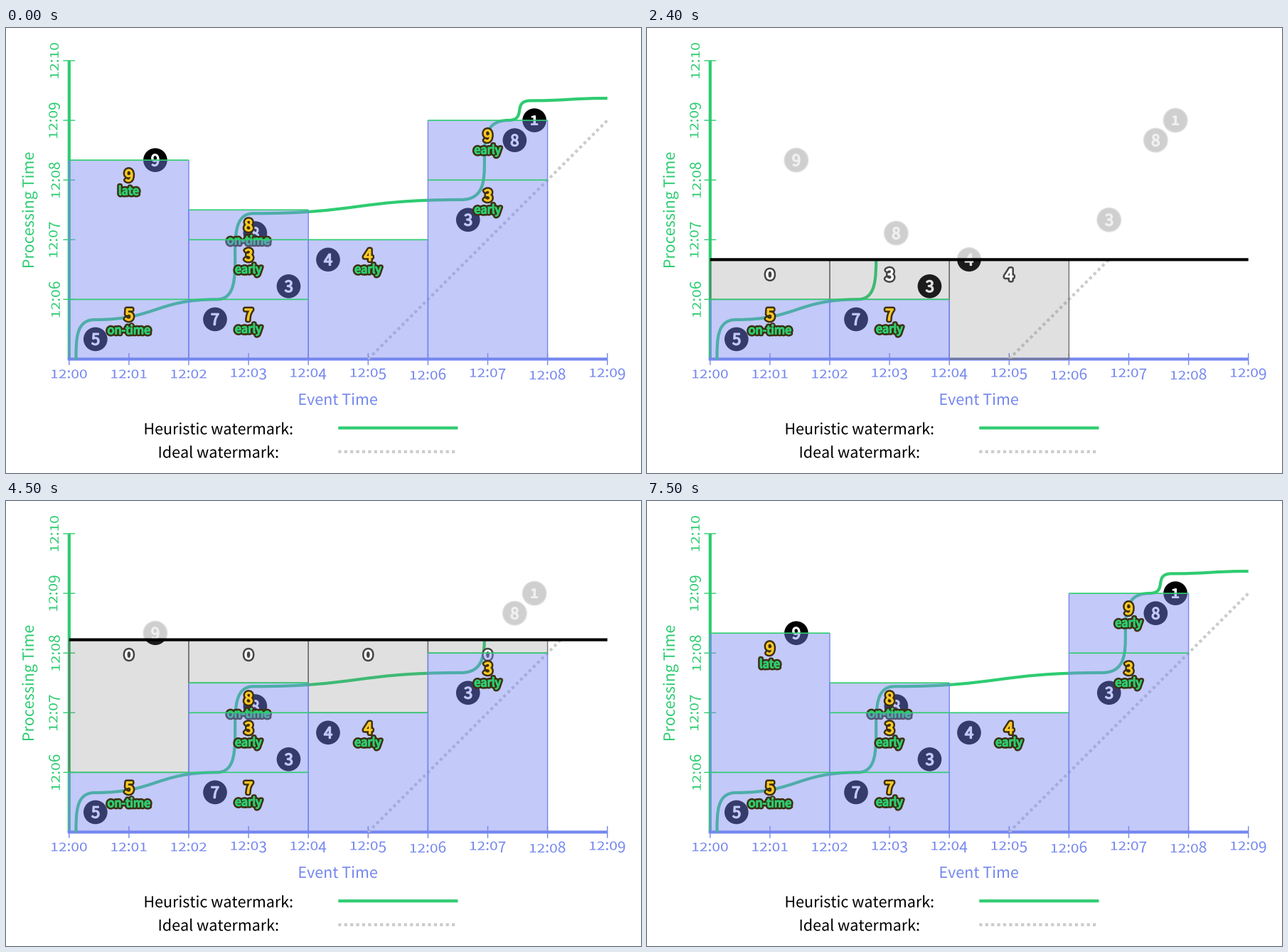
Write a matplotlib script that moves like this. It is 893x627 px and loops after 8000 ms.

```python
import math

import matplotlib.pyplot as plt
import numpy as np
from matplotlib.animation import FuncAnimation
from matplotlib.lines import Line2D
from matplotlib.patches import Circle, PathPatch, Rectangle
from matplotlib.path import Path
from matplotlib.textpath import TextPath
from matplotlib.transforms import Affine2D, Bbox

W, H, DPI = 893, 627, 64
PX = 72 / DPI
X0, Y0, MIN = 88.8, 466.5, 84.1    # plot origin and pixels per minute
UNIT = MIN / 20                    # thick stroke, base of all small sizes
THIN = UNIT / 3
STEPS, SPEED = 50, 9               # steps per loop, steps per minute
EPS = 1e-6

GREEN, BLUE, BROWN, YELLOW = "#2ecc71", "#7587ee", "#3d2f12", "#fdc926"
GRAY_FILL, BLUE_FILL = (0.48, 0.48, 0.48, 0.23), (0.47, 0.525, 0.94, 0.445)
FONT = {"family": "Noto Sans CJK JP"}
HEAVY = 1.5                        # extra weight for bold text

# event minute, arrival minute, value
EVENTS = [(0.44, 1 / 3, 5), (2.44, 2 / 3, 7), (3.67, 1.22, 3),
          (4.33, 5 / 3, 4), (3.11, 2.11, 8), (6.67, 7 / 3, 3),
          (1.44, 10 / 3, 9), (7.45, 11 / 3, 8), (7.78, 4, 1)]
# plateaus of the heuristic watermark
PLATEAUS = [(-0.2, -0.65), (0.43, 0.66), (2.47, 1), (3.08, 2.44),
            (6.55, 2.67), (7.34, 4), (7.72, 4.33), (9, 4.37)]
# minute at which the watermark passes the end of each window
CLOSES = [1, 2.5, 2.66, 4.35]

fig = plt.figure(figsize=(W / DPI, H / DPI), dpi=DPI, facecolor="white")
ax = fig.add_axes([0, 0, 1, 1])
ax.set(xlim=(0, W), ylim=(H, 0))
ax.axis("off")
layers = []


def px(minute):
    return X0 + minute * MIN


def py(minute):
    return Y0 - minute * MIN


def add(artist):
    """Stack artists in the order they are added."""
    layers.append(artist)
    artist.set_zorder(len(layers))
    artist.set_snap(False)
    return ax.add_artist(artist)


def line(xs, ys, color, width=UNIT, **kw):
    return add(Line2D(xs, ys, color=color, lw=width * PX,
                      solid_capstyle="butt", dash_capstyle="butt", **kw))


def dotted(xs, ys):
    return line(xs, ys, "#cccccc", linestyle=(0, (1, 1)))


def shape(path, color, edge="none", width=0):
    return add(PathPatch(path, fc=color, ec=edge, lw=width * PX,
                         joinstyle="round"))


def text_path(s, size):
    return TextPath((0, 0), s, size=size, prop=FONT)


def old_style(s, size):
    """Lay out text with old-style figures."""
    def advance(c):
        one, two = (text_path(t, size).get_extents().width
                    for t in (c, c + c))
        return two - one

    parts, x = [], 0
    for c in s:
        move = Affine2D()
        if c in "012":
            move.scale(1, 0.77)
        elif c in "34579":
            move.translate(0, -0.165 * size)
        parts.append(move.translate(x, 0)
                     .transform_path(text_path(c, size)))
        x += advance(":" if c == ":" else "0")
    return Path.make_compound_path(*parts)


def place(path, x, y, turn=0, baseline=False):
    box = path.get_extents()
    cx = (box.x0 + box.x1) / 2
    cy = 0 if baseline else (box.y0 + box.y1) / 2
    move = Affine2D().translate(-cx, -cy).scale(1, -1).rotate_deg(turn)
    return move.translate(x, y).transform_path(path)


def caption(s, x, y, color, turn=0):
    shape(place(text_path(s, 21.5), x, y, turn, True), color)


def tick(xs, ys, color, minute, x, y, turn=0):
    line(xs, ys, color, THIN)
    label = old_style(f"12:{minute:02d}", 21)
    shape(place(label, x, y, turn), color)


def bold(path, color):
    return shape(path, color, color, HEAVY)


def outlined(path, fill, edge):
    return [shape(path, edge, edge, HEAVY + 5), bold(path, fill)]


DIGITS = {n: old_style(str(n), 22) for n in range(10)}


def draw_axes():
    line([X0] * 2, [Y0, py(5)], GREEN)
    line([X0 - UNIT / 2, px(9)], [Y0] * 2, BLUE)
    reach = np.array([-2, 2]) * UNIT
    for m in range(1, 6):
        tick(X0 + reach, [py(m)] * 2, GREEN, m + 5, 68, py(m), -90)
    for m in range(10):
        tick([px(m)] * 2, Y0 + reach, BLUE, m, px(m), 487.5)
    caption("Processing Time", 39, py(2.5), GREEN, -90)
    caption("Event Time", px(4.5), 531, BLUE)
    caption("Heuristic watermark:", px(2.5), 572.5, "black")
    caption("Ideal watermark:", px(2.5), 605.5, "black")
    key = [px(4.5), px(6.5)]
    line(key, [563.5] * 2, GREEN)
    dotted(key, [597] * 2)


def watermark():
    """Join the plateaus with S-curves, sharper where they are steep."""
    knots = [(px(x), py(y)) for x, y in PLATEAUS]
    points = knots[:1]
    for (xa, ya), (xb, yb) in zip(knots, knots[1:]):
        reach = (xb - xa) * np.clip((ya - yb) / (xb - xa), 0.5, 1)
        points += [(xa + reach, ya), (xb - reach, yb), (xb, yb)]
    codes = [Path.MOVETO] + [Path.CURVE4] * (len(points) - 1)
    curve = shape(Path(points, codes), "none", GREEN, UNIT)
    curve.set_capstyle("butt")
    return curve


def ball(m, arrival, value, fill, ink, edge):
    x, y = px(m), py(arrival)
    disc = add(Circle((x, y), 4 * UNIT, fc=fill, ec=edge, lw=THIN * PX))
    return [disc, bold(place(DIGITS[value], x, y), ink)]


def firing(n, arrival):
    """When and how window n emits a value that arrives at this time."""
    close = CLOSES[n]
    if arrival > close:
        return arrival, "late"
    if math.ceil(arrival) < close:
        return math.ceil(arrival), "early"
    return close, "on-time"


class Window:
    """Two event minutes: an open part under the scan line, then panes."""

    def __init__(self, n):
        self.left, self.mid, self.right = (px(2 * n + i) for i in range(3))
        self.events = [e for e in EVENTS if int(e[0] // 2) == n]
        self.fires = dict(firing(n, e[1]) for e in self.events)
        self.box = add(Rectangle((self.left, Y0), 2 * MIN, 0, fc=GRAY_FILL,
                                 ec="#707070", lw=THIN * PX))
        self.label = outlined(DIGITS[0], "white", "#444444")
        self.panes = []

    def total(self, start, end):
        return sum(v for _, t, v in self.events
                   if start + EPS < t <= end + EPS)

    def add_panes(self):
        starts = [0, *sorted(self.fires)]
        for start, fire in reversed(list(zip(starts, starts[1:]))):
            self.panes.append((fire, self.pane(start, fire)))

    def pane(self, start, fire):
        top, bottom = py(fire), py(start)
        parts = [add(Rectangle((self.left, top), 2 * MIN, bottom - top,
                               fc=BLUE_FILL, ec="none"))]
        for x in (self.left, self.right):
            parts.append(line([x, x], [top, bottom], BLUE, THIN))
        parts.append(line([self.left, self.right], [top, top], GREEN,
                          UNIT * 0.4))
        digit = place(DIGITS[self.total(start, fire)], self.mid, top + 21.5)
        kind = place(text_path(self.fires[fire], 16.4), self.mid, top + 42.5)
        return parts + outlined(digit, YELLOW, BROWN) \
            + outlined(kind, GREEN, BROWN)

    def update(self, now, live):
        base = max([f for f in self.fires if f <= now + EPS], default=0)
        opened = self.total(0, now) > 0
        live = live and opened and now > base + EPS
        for a in [self.box, *self.label]:
            a.set_visible(live)
        if live:
            self.box.set_y(py(now))
            self.box.set_height(py(base) - py(now))
            digit = DIGITS[self.total(base, now)]
            for a in self.label:
                a.set_path(place(digit, self.mid, py(now) + 21))
        for fire, parts in self.panes:
            for a in parts:
                a.set_visible(fire <= now + EPS)


draw_axes()
past = [dotted([px(5), px(9)], [Y0, py(4)]), watermark()]
future = []
for e in EVENTS:
    past += ball(*e, "black", "white", "none")
    future += ball(*e, "#cfcfcf", "#f0f0f0", "#e0e0e0")
windows = [Window(n) for n in range(4)]
for w in windows:
    w.add_panes()
scan = line([X0, px(9)], [Y0, Y0], "black")


def update(i):
    step = min(i // 3, STEPS)
    done = step in (0, STEPS)
    now = 5 if done else min((step - 1) / SPEED, 5)
    y = 0 if done else py(now)

    below = Bbox.from_extents(0, H - Y0, W, H - y)
    above = Bbox.from_extents(0, H - y, W, H)
    for a in past:
        a.set_clip_box(below)
    for a in future:
        a.set_visible(not done)
        a.set_clip_box(above)
    for w in windows:
        w.update(now, not done)
    scan.set_visible(now < 5 - EPS)
    scan.set_ydata([y, y])
    return []


anim = FuncAnimation(fig, update, frames=160, interval=50, repeat=True,
                     repeat_delay=0, blit=False)
plt.show()
```
